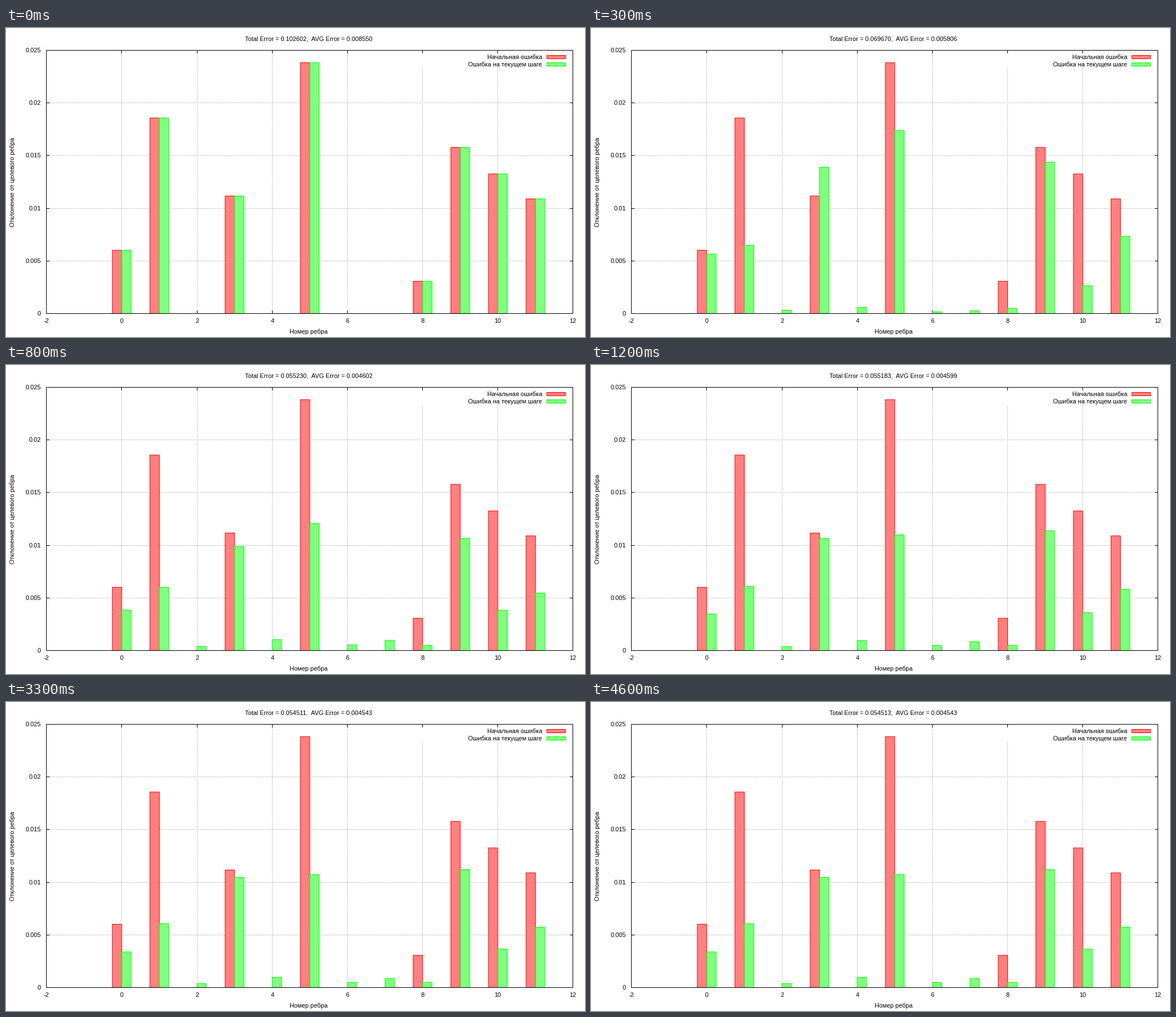
These frames come from a looping animation (1025x547 px, 5000 ms). A matplotlib script:

```python
import numpy as np
import matplotlib.pyplot as plt
from matplotlib.animation import FuncAnimation
from matplotlib.patches import Rectangle

W, H, DPI = 1025, 547, 100
LEFT, RIGHT, TOP, BOTTOM = 71.2, 1003.4, 39, 505
PX = 72 / DPI  # one pixel in points
STEP_MS, LOOP_MS = 100, 5000

RED, RED_FILL = "#ff0000", "#ff8080"
GREEN, GREEN_FILL = "#00ff00", "#80ff80"

# Error of each edge, in millionths: at the start, after the first
# correction and once settled.
START = np.array([6015, 18575, 0, 11165, 0, 23830,
                  0, 0, 3070, 15785, 13265, 10897])
FIRST = np.array([5650, 6505, 320, 13905, 590, 17390,
                  170, 280, 490, 14385, 2650, 7335])
SETTLED = np.array([3390, 6075, 390, 10470, 980, 10740,
                    490, 875, 500, 11200, 3665, 5738])

FIRST_MS = 300
DECAY_MS = 350
SWING = np.full(12, np.pi / 400)  # radians per ms
SWING[[0, 5]] *= 0.15             # these two edges relax without a swing

# The chart holds still between these times.
CHANGES = [0, 100, *range(300, 1001, 100), 1200, 1400, 1700, 2000, 3300,
           *range(3400, 4601, 300)]

plt.rcParams["font.family"] = "Liberation Sans"
plt.rcParams["font.size"] = 11 * PX

fig = plt.figure(figsize=(W / DPI, H / DPI), dpi=DPI, facecolor="white")
ax = fig.add_axes([0, 0, 1, 1])
ax.set_xlim(0, W)
ax.set_ylim(H, 0)
ax.axis("off")


def x_pos(value):
    return LEFT + (value + 2) * (RIGHT - LEFT) / 14


def y_pos(value):
    return BOTTOM - value * (BOTTOM - TOP) / 0.025


def errors_at(ms):
    """Fast first correction, then a damped swing towards the settled error."""
    if ms < FIRST_MS:
        micro = START + (FIRST - START) * np.sqrt(ms / FIRST_MS)
    else:
        t = ms - FIRST_MS
        micro = SETTLED + ((FIRST - SETTLED) * np.exp(-t / DECAY_MS)
                           * np.cos(SWING * t))
    return micro / 1e6


def line(x0, y0, x1, y1, z, color="black", **style):
    ax.plot([x0, x1], [y0, y1], color=color, lw=PX, zorder=z, snap=False,
            solid_capstyle="butt", dash_capstyle="butt", **style)


def box(x0, y0, x1, y1, edge, fill, z):
    patch = Rectangle((x0 + 0.5, y0 + 0.5), x1 - x0, y1 - y0, ec=edge,
                      fc=fill, lw=PX, zorder=z, snap=False)
    return ax.add_patch(patch)


def label(x, y, text, ha="center", **style):
    return ax.text(x, y, text, ha=ha, va="baseline", zorder=6, **style)


def bar(start, error, edge, fill, z):
    return box(x_pos(start), y_pos(error), x_pos(start + 0.25), BOTTOM,
               edge, fill, z)


DOTS = dict(color="#808080", ls=(0, (1, 2)))
x_min, x_max = round(LEFT), round(RIGHT)

for value in range(-2, 13, 2):
    x = round(x_pos(value)) + 0.5
    if -2 < value < 12:
        line(x, BOTTOM, x, TOP, 1, **DOTS)
        line(x, TOP, x, TOP + 6, 3)
        line(x, BOTTOM - 5, x, BOTTOM + 1, 3)
    label(x, 522, str(value))

for k in range(6):
    value = k * 0.005
    y = round(y_pos(value)) + 0.5
    if 0 < k < 5:
        line(x_min, y, x_max, y, 1, **DOTS)
        line(x_min, y, x_min + 6, y, 3)
        line(x_max - 5, y, x_max + 1, y, 3)
    label(62, y + 3.5, f"{value:g}", ha="right")

# Legend on an opaque white patch
ax.add_patch(Rectangle((700, 44), 297, 28, fc="white", ec="none", zorder=2))
for y, name, edge, fill in ((51, "Начальная ошибка", RED, RED_FILL),
                            (64, "Ошибка на текущем шаге", GREEN, GREEN_FILL)):
    label(949, y + 4, name, ha="right")
    box(957, y - 3, 990, y + 3, edge, fill, 6)

label(535.5, 541, "Номер ребра")
label(15, 272.5, "Отклонение от целевого ребра", rotation=90,
      rotation_mode="anchor")
title = label(535.5, 23, "")

green_bars = []
for i, error in enumerate(errors_at(0)):
    if error:
        bar(i - 0.25, error, RED, RED_FILL, 4)
    green_bars.append(bar(i, error, GREEN, GREEN_FILL, 4.5))
box(x_min, TOP, x_max, BOTTOM, "black", "none", 5)


def update(frame):
    now = max(t for t in CHANGES if t <= frame * STEP_MS)
    errors = errors_at(now)
    for patch, error in zip(green_bars, errors):
        top = y_pos(error)
        patch.set_y(top + 0.5)
        patch.set_height(BOTTOM - top)
    total = errors.sum()
    title.set_text(f"Total Error = {total:.6f},  AVG Error = {total / 12:.6f}")
    return [*green_bars, title]


anim = FuncAnimation(fig, update, frames=LOOP_MS // STEP_MS, interval=STEP_MS,
                     repeat=True, repeat_delay=0, blit=False)
plt.show()
```
